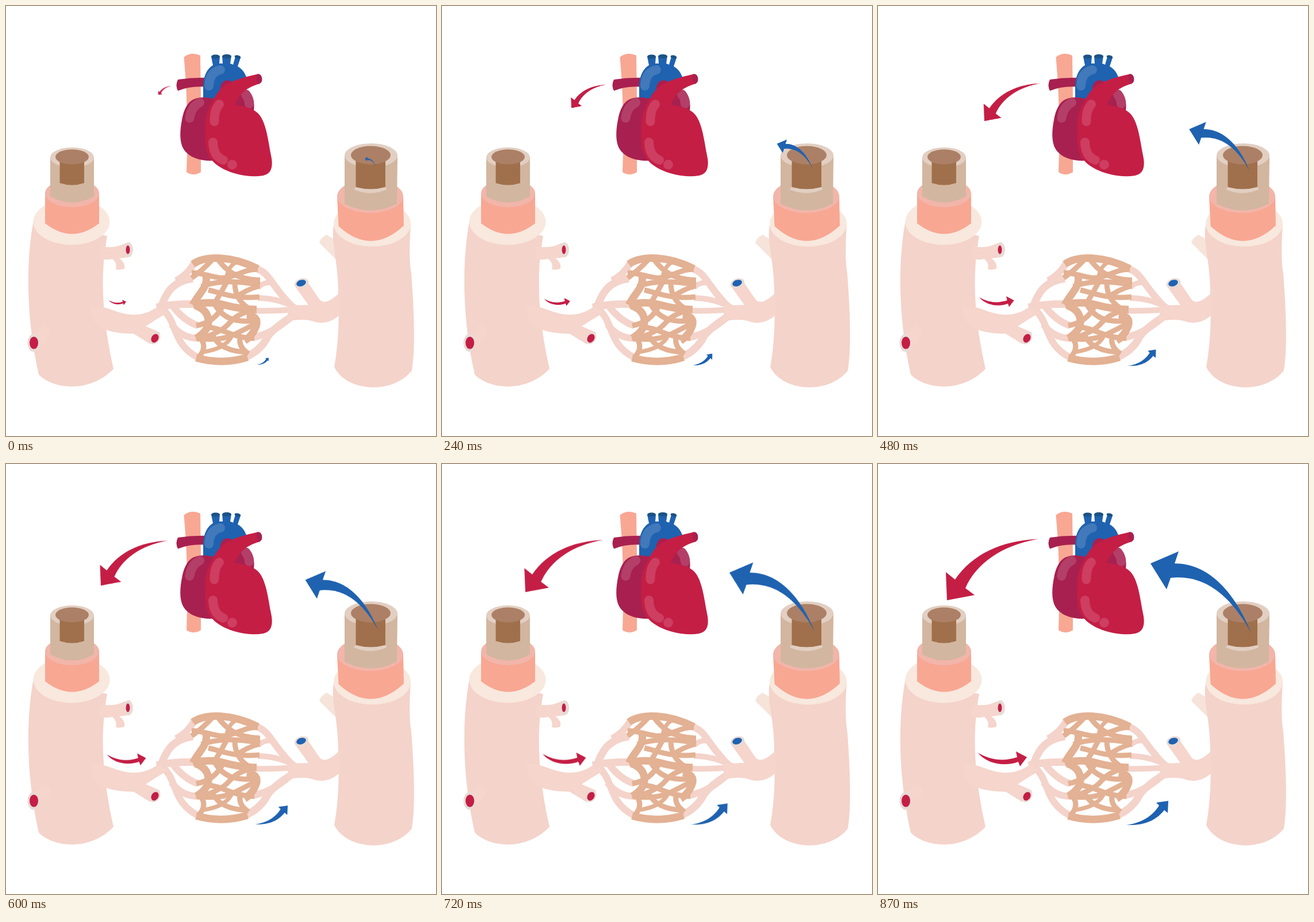
These frames come from a looping animation (748 px wide and 748 px high, 0.9 s). An HTML page without scripts:

```html
<!DOCTYPE html>
<html lang="en">
<head>
<meta charset="utf-8">
<title>Blood circulation</title>
<style>
  html, body { margin: 0; width: 100%; height: 100%; overflow: hidden; background: #fff; }
  svg { display: block; width: 100vw; height: 100vh; }

  .flesh { fill: #f4d3ca; }
  .branch { fill: #f5d5cc; }
  .cream { fill: #f8e8dd; }
  .salmon { fill: #f8a793; }
  .salmon-rim { fill: #f2b5aa; }
  .tan { fill: #d2b6a0; }
  .tan-rim { fill: #e2cfc2; }
  .lumen { fill: #ac8066; }
  .wall { fill: #a0704c; }
  .cut { fill: #e9dad5; }
  .red { fill: #c41e45; }
  .wine { fill: #a8204f; }
  .blue { fill: #1f62b0; }
  .navy { fill: #1b5286; }

  .lines { fill: none; }
  .veins { stroke: #f4d3ca; stroke-width: 12; }
  .net { stroke: #e3b193; stroke-width: 9; }
  .thick { stroke-width: 13; }
  .thin { stroke-width: 7; }
  .shine { stroke-width: 16; stroke-linecap: round; }

  .arrow { animation: grow 900ms steps(30, jump-none) infinite; }
  @keyframes grow {
    from { transform: scale(var(--start)); }
    to { transform: scale(1); }
  }
  .to-artery { --start: .145; transform-origin: 289.5px 140.8px; }
  .to-heart { --start: .109; transform-origin: 642.4px 276.3px; }
  .to-net { --start: .353; transform-origin: 181.7px 517px; }
  .to-vein { --start: .288; transform-origin: 437.6px 622.5px; }
</style>
</head>
<body>
<svg viewBox="0 0 748 748">
  <!-- heart -->
  <g>
    <path class="salmon" d="M309.500 89Q322 79 338 86L339 160V289Q326 297 314 289Q318 180 309.500 89Z"/>
    <path class="wine" d="M299 128Q325 124 352 125V141Q322 138 299 147.500Q294 138 299 128Z"/>
    <path class="blue" d="M343 168V140C343 122 350 109 360 103L357 88H372L371 100H377L376 87H392L390 100L395 102L399 88L408 90L403 105Q417 113 420 132L400 170Z"/>
    <g class="navy">
      <ellipse cx="364.500" cy="88" rx="7.500" ry="3.500"/>
      <ellipse cx="384" cy="87.500" rx="8" ry="3.500"/>
      <ellipse cx="403" cy="88.500" rx="5.500" ry="2.800" transform="rotate(14 403 88.500)"/>
    </g>
    <path class="lines shine" stroke="#4179ba" d="M353 139Q354 115 373 111"/>
    <path class="wine" d="M372 148Q373 129 386 129Q397 131 397 142Z"/>
    <path class="wine" d="M395 174Q405 138 422 147Q434 160 431 183Z"/>
    <path class="lines shine" stroke="#b33f68" d="M417 154Q423 161 423 170"/>
    <path class="wine" d="M362 161C326 154 314 165 307 193C300 226 303 245 314 255C325 266 342 270 362 269Z"/>
    <path class="lines shine" stroke="#b33f68" d="M319.500 195Q322 175 337 168"/>
    <path class="red" d="M360 165C373 132 404 127 439 118Q447 125 442 135Q409 143 398 172Q432 176 442 191C454 208 457 241 462 265C465 285 458 293 447 295C424 299 398 293 379 284C354 271 346 255 346.500 229C345 200 349 181 360 165Z"/>
    <ellipse class="wine" cx="440.500" cy="126.500" rx="4.800" ry="8" transform="rotate(-8 440 126)"/>
    <g class="lines shine" stroke="#cd3e60">
      <path d="M362.500 201Q362 181 371 171"/>
      <path d="M360 237Q361 262 378 268"/>
    </g>
    <circle cx="393.500" cy="276" r="8.500" fill="#cd3e60"/>
  </g>

  <!-- branches into and out of the capillaries -->
  <g class="lines veins">
    <path class="thick" d="M268 528C279 496 291 479 325 474"/>
    <path d="M296 478Q316 467 327 448"/>
    <path class="thick" d="M262 524Q288 518 327 518.500"/>
    <path d="M290 522Q310 548 334 556"/>
    <path d="M273 528C300 552 288 588 335 612"/>
    <path d="M288 554Q306 578 334 578"/>
    <path d="M433 456C464 466 456 484 505 530"/>
    <path d="M438 490Q450 479 462 482" stroke-width="9"/>
    <path d="M438 508Q474 508 506 526" stroke-width="10"/>
    <path d="M434 530Q470 531 508 527" stroke-width="10"/>
    <path d="M428 577Q466 570 500 537"/>
    <path class="thick" d="M416 611Q443 600 456 574Q470 556 508 534"/>
  </g>

  <!-- capillary net -->
  <g class="lines net" stroke-linejoin="round">
    <path class="thick" d="M325 449C348 433 394 435 438 457"/>
    <path d="M323 473Q343 459 360 440"/>
    <path d="M323 464C348 464 368 478 390 471S420 458 438 458"/>
    <path d="M368 440C382 459 400 476 442 477"/>
    <path class="thin" d="M404 444Q388 450 384 470"/>
    <path class="thick" d="M347 466C354 488 336 498 325 520"/>
    <path d="M340 488C370 476 407 479 442 485"/>
    <path d="M388 472Q374 500 362 518"/>
    <path class="thick" d="M325 519Q356 513 380 520T436 528"/>
    <path d="M352 494C378 500 398 510 441 506"/>
    <path d="M398 482C398 504 410 520 426 528"/>
    <path d="M441 487Q418 493 400 507"/>
    <path class="thick" d="M329 521Q350 528 352 546T331 578"/>
    <path d="M331 556Q364 550 378 520"/>
    <path d="M362 517C376 543 398 552 438 547"/>
    <path d="M430 529Q402 535 388 552T332 580"/>
    <path d="M347 558C378 560 394 578 432 578"/>
    <path class="thick" d="M419 537Q441 540 435 557T415 582"/>
    <path d="M331 577Q370 585 400 570T438 550"/>
    <path d="M340 580Q350 596 334 612"/>
    <path d="M360 574Q374 601 420 602"/>
    <path class="thin" d="M340 602Q378 598 392 576"/>
    <path d="M408 572Q402 592 422 605"/>
    <path class="thick" d="M331 612Q376 625 420 611"/>
  </g>

  <!-- artery -->
  <g>
    <path class="flesh" d="M48 373C35 440 34 540 57 641C83 668 148 673 187 631C171 560 161 480 176 400Z"/>
    <path class="branch" d="M147 521C175 520 194 537 222 537Q245 537 264 523L282 533Q258 547 243 557L268 568L251 588L222 570Q180 570 160 556Q146 543 147 521Z"/>
    <path class="branch" d="M166 418Q188 423 209 412L213 437L197 439Q208 446 206 457Q198 460 191 458Q194 447 185 440Q166 444 161 434Z"/>
    <path class="branch" d="M48 571Q60 568 64 555Q83 562 76 573Q64 593 49 601Z"/>
    <ellipse class="cut" cx="213" cy="424" rx="8" ry="13"/>
    <ellipse class="red" cx="212" cy="424" rx="3.500" ry="7.500"/>
    <ellipse class="cut" cx="48" cy="586" rx="10.500" ry="15.500"/>
    <ellipse class="red" cx="48.500" cy="586" rx="7.500" ry="10.800"/>
    <ellipse class="cut" cx="259" cy="577.500" rx="8.500" ry="11.500" transform="rotate(30 259 577.500)"/>
    <ellipse class="red" cx="259" cy="578" rx="6" ry="8" transform="rotate(30 259 578)"/>

    <ellipse class="cream" cx="114" cy="375.500" rx="66.500" ry="40"/>
    <path class="salmon" d="M68 326V378Q115 415 162 378V326Z"/>
    <ellipse class="salmon-rim" cx="115" cy="326" rx="47" ry="24"/>
    <path class="tan" d="M77 263V331Q115 353 153 331V263Z"/>
    <ellipse class="tan-rim" cx="115" cy="263.500" rx="38" ry="17.500"/>
    <path class="wall" d="M93.500 262V308Q115 315 136 308V262Z"/>
    <ellipse class="lumen" cx="115" cy="262.500" rx="29" ry="13"/>
  </g>

  <!-- vein -->
  <g>
    <path d="M545 412Q548 402 558 398L576 409V443Z" fill="#f6e3da"/>
    <path class="flesh" d="M571 378C563 405 578 440 578 500C580 545 578 590 571 628C592 671 672 677 706 634C713 590 709 520 705 465Q700 440 704 380Z"/>
    <path class="branch" d="M490 521L526 520L503 488L526 482L545 510Q555 523 580 499V538Q560 555 539 550Q518 542 490 549Z"/>
    <ellipse class="cut" cx="514" cy="482.500" rx="12.500" ry="8.500" transform="rotate(-18 514 482.500)"/>
    <ellipse class="blue" cx="513.500" cy="482" rx="8.500" ry="5.500" transform="rotate(-18 513.500 482)"/>

    <ellipse class="cream" cx="637" cy="379" rx="67" ry="39.500"/>
    <path class="salmon" d="M576 331L578.500 383Q635 435 692 382L691 331Z"/>
    <ellipse class="salmon-rim" cx="633.500" cy="331" rx="57.500" ry="29"/>
    <path class="tan" d="M589 260V344Q635 367 680 344L681 260Z"/>
    <ellipse class="tan-rim" cx="635" cy="260" rx="46" ry="21"/>
    <path class="tan-rim" d="M609 314L605 319Q634 332 662 319L660 314Z"/>
    <path class="wall" d="M608.500 260V315Q634 322 660 315V260Z"/>
    <ellipse class="lumen" cx="634.500" cy="259.500" rx="34.500" ry="16"/>
  </g>

  <!-- flow arrows -->
  <path class="arrow red to-artery" d="M279 130.500C215 133 164 157 134 201L118 188L120 237L168 228L152 216C170 174 215 141 279 130.500Z"/>
  <path class="arrow blue to-heart" d="M474 173L523 152L516 173C575 173 620 222 649 293C618 238 575 191 509 198L502 218Z"/>
  <path class="arrow red to-net" d="M174 502.500C196 515 218 518 242 510L240 500L259 510L247 526L244 518C220 527 190 522 174 502.500Z"/>
  <path class="arrow blue to-vein" d="M432 628C460 624 478 612 489 594L484 589L505 586L504 607L498 602C482 622 461 629 432 628Z"/>
</svg>
</body>
</html>
```
